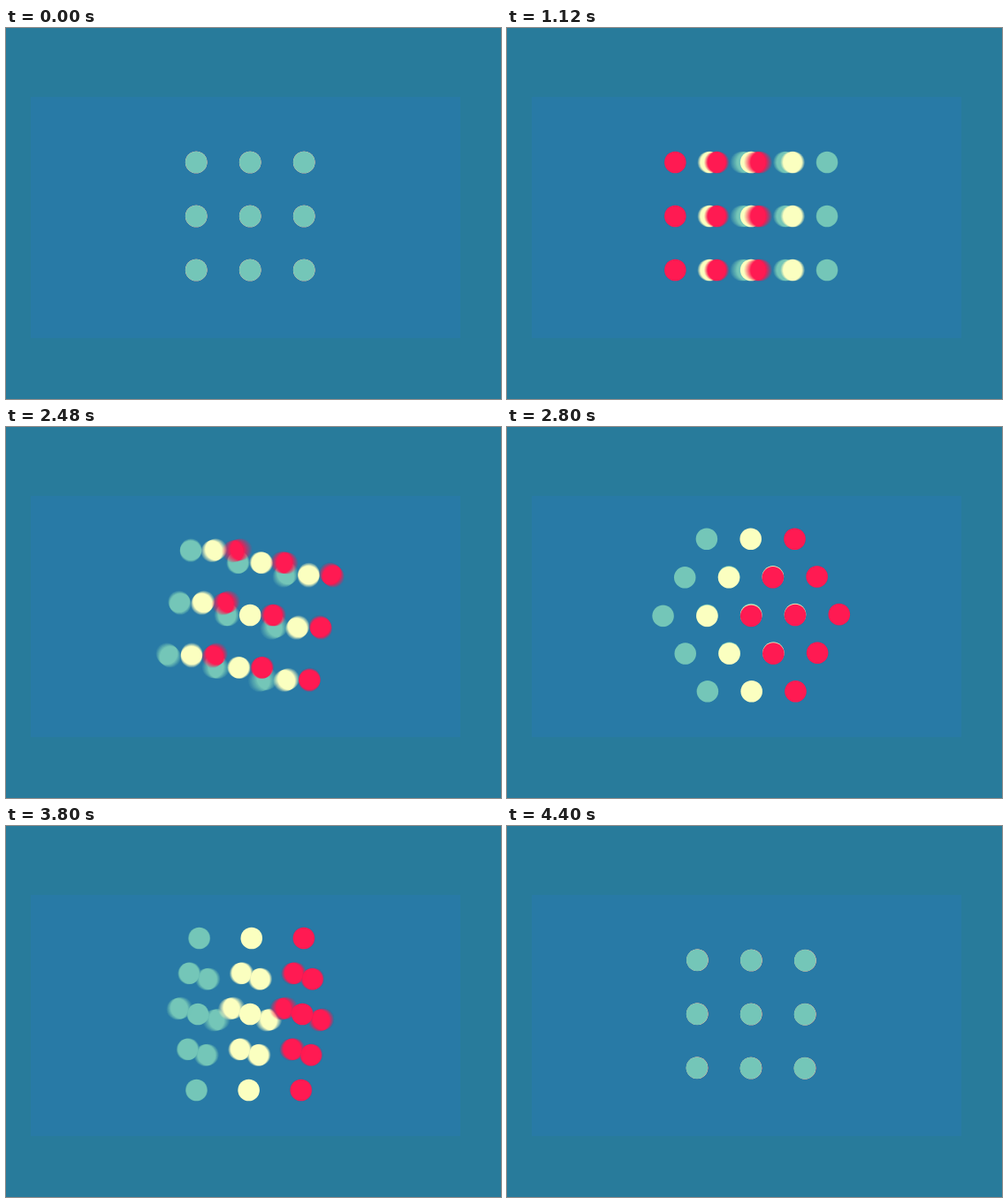
An HTML page with a canvas for the animation above (4.84 s loop, 560x420 px).

```html
<!DOCTYPE html>
<html lang="en">
<head>
<meta charset="utf-8">
<title>Turning dot cube</title>
<style>
  html, body { margin: 0; width: 100%; height: 100%; overflow: hidden; background: #287b9b; }
  canvas { display: block; width: 560px; height: 420px; }
</style>
</head>
<body>
<canvas id="stage" width="560" height="420"></canvas>
<script>
const W = 560, H = 420, LOOP = 4840, STEP = 40;
const CX = 276.2, CY = 213, GAP = 61, R = 12.3;
const SHUTTER = 24, SAMPLES = 12;
const RAD = Math.PI / 180;
const BACK = '#287b9b', PANEL = '#287aa6';
const COLORS = ['#ff1a52', '#fbffc0', '#74c6b8'];

// Moves: [start ms, duration ms, degrees]
const YAW = [[70, 1772, 180], [2020, 940, 55.1], [3360, 1160, 124.9]];
const ROLL = [[2095, 880, 45], [3420, 1150, 45]];

const ctx = document.getElementById('stage').getContext('2d');
const layer = document.createElement('canvas');
layer.width = W;
layer.height = H;
const pen = layer.getContext('2d');

const grid = [-1, 0, 1];
const cube = grid.flatMap(k => grid.flatMap(j => grid.map(i => ({ i, j, k }))));

function ease(u) {
  u = Math.min(1, Math.max(0, u));
  return u < 0.5 ? 8 * u ** 4 : 1 - 8 * (1 - u) ** 4;
}

function angle(moves, t) {
  return RAD * moves.reduce((sum, [start, time, deg]) => sum + deg * ease((t - start) / time), 0);
}

// Roll the layers in their own plane, then yaw the cube about the upright axis.
function project(t) {
  const yaw = angle(YAW, t), roll = angle(ROLL, t);
  const cy = Math.cos(yaw), sy = Math.sin(yaw);
  const cr = Math.cos(roll), sr = Math.sin(roll);
  return cube.map(({ i, j, k }) => {
    const x = i * cr + j * sr;
    const y = j * cr - i * sr;
    return {
      x: CX + GAP * (x * cy + k * sy),
      y: CY + GAP * y,
      z: k * cy - x * sy,
      color: COLORS[k + 1]
    };
  }).sort((a, b) => a.z - b.z);
}

function drawScene(t) {
  pen.fillStyle = BACK;
  pen.fillRect(0, 0, W, H);
  pen.fillStyle = PANEL;
  pen.fillRect(28, 78, 486, 273);
  for (const dot of project(t)) {
    pen.fillStyle = dot.color;
    pen.beginPath();
    pen.arc(dot.x, dot.y, R, 0, 2 * Math.PI);
    pen.fill();
  }
}

function moving(t) {
  return [...YAW, ...ROLL].some(([start, time]) =>
    t > start - SHUTTER && t < start + time + SHUTTER);
}

// Average several instants within the shutter time for motion blur.
function render(t) {
  const count = moving(t) ? SAMPLES : 1;
  for (let n = 0; n < count; n++) {
    drawScene(t + SHUTTER * ((n + 0.5) / count - 0.5));
    ctx.globalAlpha = 1 / (n + 1);
    ctx.drawImage(layer, 0, 0);
  }
  ctx.globalAlpha = 1;
}

const begin = performance.now();
let shown = -1;

function tick() {
  const t = Math.max(0, performance.now() - begin) % LOOP;
  const step = Math.floor(t / STEP) * STEP;
  if (step !== shown) {
    shown = step;
    render(step);
  }
  requestAnimationFrame(tick);
}

tick();
</script>
</body>
</html>
```
